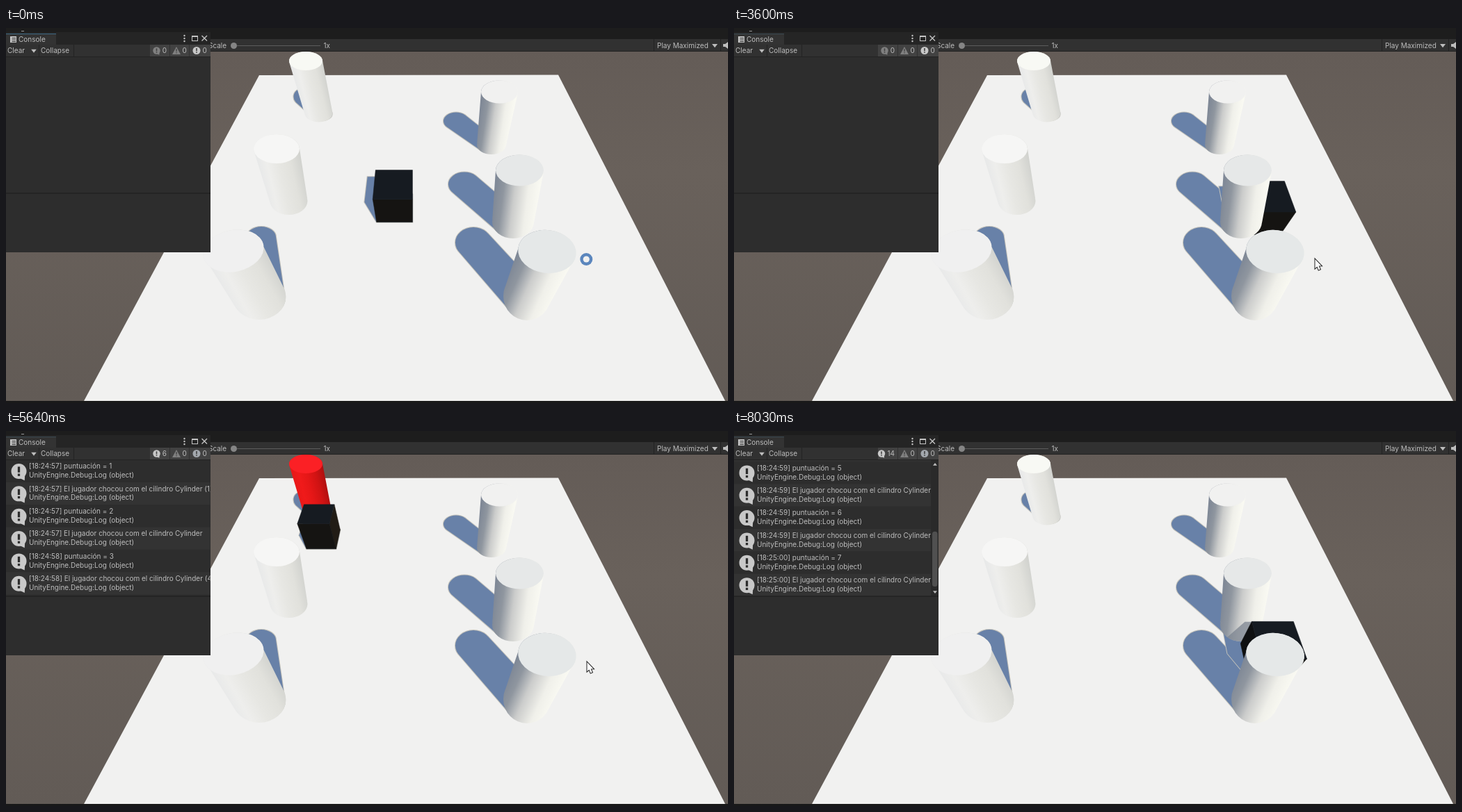
Recreate the animation shown at these times as an HTML page with a canvas. Size 1038 by 540 pixels, loop 8.44 s.

```html
<!DOCTYPE html>
<html lang="es">
<head>
<meta charset="utf-8">
<style>
html, body { margin: 0; width: 100%; height: 100%; overflow: hidden; background: #191919; }
canvas { display: block; }
</style>
</head>
<body>
<canvas id="stage" width="1038" height="540"></canvas>
<script>
const ctx = document.getElementById('stage').getContext('2d');
const LOOP = 8440;
const FONT = '10px Inter, sans-serif';
const SHADOW = '#6881a8', RIM = '#c2c1ba';
const HALF = 0.488, HEIGHT = 0.97;       // cube size
const LIGHT = { x: -0.39, z: 0.7 };      // shadow offset per unit of height

// Cube moves: start, end, steps, target x, target z (front face)
const START = [-0.48, 4.8];
const MOVES = [
  [1500, 1500, 1, -0.48, 5.95], [1680, 1820, 3, -0.48, 9.06],
  [2030, 2290, 5, 1.94, 9.06], [2500, 2690, 4, 3.85, 9.06],
  [2830, 3030, 4, 3.85, 6.25], [3290, 3430, 3, 3.84, 4.4],
  [3600, 3710, 3, 1.96, 4.4], [3980, 4260, 5, 1.96, 6.74],
  [4460, 4510, 2, 1.96, 7.85], [4580, 5250, 11, -2.42, 7.9],
  [5310, 5640, 6, -3, 7.9], [5710, 6090, 7, -3, 3.84],
  [6170, 6440, 5, -2.75, 0.21], [6500, 6980, 8, 2.9, 0.82],
  [7060, 7310, 5, 3.1, 3.21]
];

// Ellipses are [cx, cy, rx, ry, rotation]; tip is the far end of the shadow.
const CYLINDERS = [
  { x: -3.5, z: 9.84, top: [431, 47.5, 24, 13.5], base: [449.5, 123, 20, 12.5], tip: [424, 99, 10.5, 11], cap: '#f8f9f4', red: [5250, 5770] },
  { x: 2.64, z: 8.05, top: [709.5, 92, 26.5, 16.5], base: [698, 168, 21, 14], tip: [647, 134, 18, 12.5], cap: '#f1f1f0', red: [4260, 4650] },
  { x: -3.57, z: 5.7, top: [389, 174, 33, 21], base: [406.5, 249, 27, 20], cap: '#f6f6f5', red: [5840, 6090] },
  { x: 2.75, z: 4.85, top: [738.5, 205, 34.5, 22.5], base: [729, 279, 30, 24], tip: [659, 225, 23, 17.5], cap: '#e6e8e8', red: [3640, 4120] },
  { x: -3.6, z: 2.77, top: [327, 321, 44, 30, -0.2], base: [364, 387, 38.5, 33], tip: [367, 301, 21, 15], cap: '#f0f0f0', red: [6170, 6400] },
  { x: 2.66, z: 2.6, top: [778, 322, 42, 31, 0.12], base: [749, 386, 34, 35], tip: [672, 309, 26, 22], cap: '#e5e8e8', red: [7120, 7310] }
];
const SIDES = {
  left: ['#e8e9e9', '#eeeeec', '#e7e7e3', '#e1e1dc', '#d2d3cf'],
  right: ['#7f8896', '#8f969f', '#cbcccb', '#f0f0ea', '#f9f9f2'],
  redLeft: ['#e81818', '#f01a1a', '#e61717', '#d01313', '#b01010'],
  redRight: ['#8c0f12', '#b81215', '#de1619', '#ee1a1a', '#dc1515']
};

// Score messages: time shown, clock, cylinder hit
const HITS = [
  [3710, '18:24:57', ' (1)'], [4260, '18:24:57', ''], [5310, '18:24:58', ' (4)'],
  [5840, '18:24:59', ' (3)'], [6170, '18:24:59', ' (2)'], [6300, '18:24:59', ' (2)'],
  [7120, '18:25:00', ' (5)']
];

function progress(t, t0, t1, steps) {
  if (t < t0) return 0;
  const i = Math.floor((t - t0) / (t1 - t0 || 1) * (steps - 1) + 1e-6);
  return Math.min(steps, i + 1) / steps;
}

function cubeAt(t) {
  let [x, z] = START;
  for (const [t0, t1, steps, tx, tz] of MOVES) {
    const p = progress(t, t0, t1, steps);
    x += (tx - x) * p;
    z += (tz - z) * p;
  }
  return { x, l: x - HALF, r: x + HALF, z, b: z + 1 };
}

function project(x, y, z) {
  const down = 6.69 - y, depth = z * 0.571 + down * 0.821;
  return [584 + 436 * x / depth, 286 + 436 * (down * 0.571 - z * 0.821) / depth];
}

function rect(x, y, w, h, color) {
  ctx.fillStyle = color;
  ctx.fillRect(x, y, w, h);
}

function poly(points, fill, stroke, width = 1) {
  ctx.beginPath();
  points.forEach(p => ctx.lineTo(...p));
  ctx.closePath();
  if (stroke) { ctx.strokeStyle = stroke; ctx.lineWidth = width; ctx.stroke(); }
  ctx.fillStyle = fill;
  ctx.fill();
}

function disc([cx, cy, rx, ry = rx, rot = 0], fill) {
  ctx.beginPath();
  ctx.ellipse(cx, cy, rx, ry, rot, 0, 7);
  ctx.fillStyle = fill;
  ctx.fill();
}

function label(str, x, y, color = '#bdbdbd', align = 'left') {
  ctx.font = FONT;
  ctx.textAlign = align;
  ctx.textBaseline = 'middle';
  ctx.fillStyle = color;
  ctx.fillText(str, x, y);
}

function clipped(path, draw) {
  ctx.save();
  ctx.clip(path);
  draw();
  ctx.restore();
}

function box(x, y, w, h) {
  const path = new Path2D();
  path.rect(x, y, w, h);
  return path;
}

// Points where lines along an axis with normal (nx, ny) touch an ellipse
function tangents([cx, cy, rx, ry], nx, ny) {
  const k = Math.hypot(rx * nx, ry * ny), ox = rx * rx * nx / k, oy = ry * ry * ny / k;
  return [[cx - ox, cy - oy], [cx + ox, cy + oy]];
}

// Outline of ellipse a swept to the lower ellipse b
function sweep(a, b) {
  const nx = b[1] - a[1], ny = a[0] - b[0];
  const [al, ar] = tangents(a, nx, ny), [bl, br] = tangents(b, nx, ny);
  const path = new Path2D();
  for (const [cx, cy, rx, ry, rot = 0] of [a, b]) {
    const ring = new Path2D();
    ring.ellipse(cx, cy, rx, ry, rot, 0, 2 * Math.PI);
    path.addPath(ring);
  }
  path.moveTo(...al);
  [ar, br, bl].forEach(p => path.lineTo(...p));
  path.closePath();
  return path;
}

function drawCylinderShadow({ x, base: [cx, cy, rx, ry], tip }) {
  if (!tip) return;
  const foot = [cx - Math.sign(x) * rx * 0.2, cy + ry * 0.05, rx * 0.76, ry * 0.76];
  const shape = sweep(tip, foot);
  ctx.strokeStyle = RIM;
  ctx.lineWidth = 2;
  ctx.stroke(shape);
  ctx.fillStyle = SHADOW;
  ctx.fill(shape);
}

// Gradient across the axis of a cylinder
function sideGradient(top, base, colors) {
  const ux = base[1] - top[1], uy = top[0] - base[0];
  const mx = (top[0] + base[0]) / 2, my = (top[1] + base[1]) / 2;
  const r = (top[2] + base[2]) / 2 / Math.hypot(ux, uy);
  const g = ctx.createLinearGradient(mx - ux * r, my - uy * r, mx + ux * r, my + uy * r);
  [0, 0.2, 0.45, 0.75, 1].forEach((stop, i) => g.addColorStop(stop, colors[i]));
  return g;
}

// Shadow of the cube on an upright plane at the given depth
function castShadow({ l, r, z, b }, plane) {
  const land = ([x, depth]) => {
    const drop = (plane - depth) / LIGHT.z;
    return project(x + LIGHT.x * drop, HEIGHT - drop, plane);
  };
  poly([[l, z], [l, b], [r, b], [r, z]].map(land), 'rgba(125,132,145,0.75)');
}

function drawCylinder({ x, z, top, base, cap, red }, cube, t) {
  const hot = t >= red[0] && t < red[1];
  const side = x < 0 ? ['left', 'redLeft'] : ['right', 'redRight'];
  const body = sweep(top, base), plane = z - 0.5;
  ctx.fillStyle = sideGradient(top, base, SIDES[side[+hot]]);
  ctx.fill(body);
  if (cube.b < plane) clipped(body, () => castShadow(cube, plane));
  disc(top, hot ? '#fb2025' : cap);
}

function drawCubeShadow({ l, r, z, b }) {
  const { x: dx, z: dz } = LIGHT;
  const outline = [[l, z], [r, z], [r, b], [r + dx, b + dz], [l + dx, b + dz], [l + dx, z + dz]];
  poly(outline.map(([px, pz]) => project(px, 0, pz)), SHADOW, RIM, 2);
}

function drawCube({ l, r, z, b }) {
  const h = HEIGHT;
  const face = (color, ...corners) => poly(corners.map(c => project(...c)), color, color, 0.5);
  if (l > 0) face('#0f1011', [l, 0, z], [l, h, z], [l, h, b], [l, 0, b]);
  if (r < 0) face('#211c15', [r, 0, z], [r, h, z], [r, h, b], [r, 0, b]);
  face('#151412', [l, 0, z], [r, 0, z], [r, h, z], [l, h, z]);
  face('#161b21', [l, h, z], [r, h, z], [r, h, b], [l, h, b]);
}

function drawScene(t) {
  const sky = ctx.createLinearGradient(0, 34, 0, 537);
  sky.addColorStop(0, '#645c57');
  sky.addColorStop(0.35, '#69615b');
  sky.addColorStop(1, '#625b56');
  rect(0, 34, 1038, 503, sky);
  poly([[364, 68], [794, 67.5], [1034.5, 538], [111.5, 538]], '#f1f1f0');
  const cube = cubeAt(t);
  CYLINDERS.forEach(drawCylinderShadow);
  drawCubeShadow(cube);
  const items = CYLINDERS.map(c => [Math.hypot(c.x, c.z), () => drawCylinder(c, cube, t)]);
  items.push([Math.hypot(cube.x, cube.z + 0.5), () => drawCube(cube)]);
  items.sort((a, b) => b[0] - a[0]).forEach(item => item[1]());
}

function arrow(x, y, size, dir = 1) {
  poly([[x - size, y - size * 0.6 * dir], [x + size, y - size * 0.6 * dir], [x, y + size * 0.7 * dir]], '#bdbdbd');
}

function drawGameBar() {
  rect(0, 0, 1038, 16, '#1d1d1d');
  rect(0, 16, 1038, 18, '#313131');
  rect(0, 33, 1038, 1, '#222');
  label('Scale', 291, 25.5);
  rect(328, 25, 124, 1, '#5c5c5c');
  disc([327.5, 25.5, 4.5], '#858585');
  label('1x', 456.5, 25.5);
  rect(931, 16, 1, 17, '#222');
  label('Play Maximized', 936, 25.5);
  arrow(1019, 25.5, 4);
  rect(1027, 16, 1, 17, '#222');
  poly([[1031, 23], [1034, 23], [1038, 20], [1038, 30], [1034, 27], [1031, 27]], '#bdbdbd');
  rect(0, 537, 1038, 3, '#191919');
}

function bubble(x, y, r, color, mark) {
  disc([x, y, r], color);
  poly([[x - r * 0.1, y + r * 0.8], [x + r * 0.8, y + r * 0.3], [x + r * 0.75, y + r * 1.2]], color);
  rect(x - r * 0.15, y - r * 0.6, r * 0.3, r * 0.75, mark);
  rect(x - r * 0.15, y + r * 0.32, r * 0.3, r * 0.3, mark);
}

function drawMessages(count) {
  const scrolled = count > 6, right = scrolled ? 283 : 293.5, pitch = 32.35;
  const rows = HITS.flatMap(([, clock, name], i) => [
    `[${clock}] puntuación = ${i + 1}`,
    `[${clock}] El jugador chocou com el cilindro Cylinder${name}`
  ]).slice(0, count);
  clipped(box(0, 42, right, 196), () => rows.forEach((text, i) => {
    const y = scrolled ? 238 - (count - i) * pitch : 41.5 + i * pitch;
    rect(0, y, 294, pitch, i % 2 ? '#333' : '#2d2d2d');
    bubble(18.5, y + 16.5, 11, '#c8c8c8', '#2d2d2d');
    label(text, 33, y + 9.8);
    label('UnityEngine.Debug:Log (object)', 33, y + 22.6);
  }));
  if (!scrolled) return;
  rect(283, 42, 11, 196, '#2a2a2a');
  arrow(289, 48, 3, -1);
  arrow(289, 232, 3);
  const h = 183 * 196 / (count * pitch);
  ctx.beginPath();
  ctx.roundRect(285, 224 - h, 7.5, h, 3.5);
  ctx.fillStyle = '#505050';
  ctx.fill();
}

function drawConsole(count, focused) {
  rect(0, 6, 294, 317, '#252525');
  rect(0, 8, 72, 16, '#333');
  rect(0, 8, 72, 1, focused ? '#3d6a85' : '#3c4a52');
  rect(22, 4, 4, 1, '#999');
  rect(6, 12, 9, 9, '#c4c4c4');
  [14, 16.5, 19].forEach(y => rect(8.5, y, 5.5, 1, '#333'));
  label('Console', 18, 17);
  [11, 15, 19].forEach(y => disc([256.5, y, 1.2], '#c4c4c4'));
  ctx.strokeStyle = '#c4c4c4';
  ctx.lineWidth = 1;
  ctx.strokeRect(267.5, 11.5, 8, 7);
  rect(267, 11, 9, 2, '#c4c4c4');
  ctx.lineWidth = 1.4;
  ctx.beginPath();
  ctx.moveTo(281.5, 11); ctx.lineTo(289, 18.5);
  ctx.moveTo(289, 11); ctx.lineTo(281.5, 18.5);
  ctx.stroke();

  rect(0, 24, 294, 17, '#313131');
  label('Clear', 2, 33);
  arrow(40, 33, 3.8);
  label('Collapse', 50, 33);
  [47, 97].forEach(x => rect(x, 24, 1, 17, '#232323'));
  [[207, 28], [236, 27], [264, 30]].forEach(([x, w]) => rect(x, 24, w, 17, '#424242'));
  bubble(count > 9 ? 212 : 216.5, 32.5, 5.2, count ? '#c8c8c8' : '#808080', '#424242');
  label(count, 231, 33, '#bdbdbd', 'right');
  poly([[245, 27], [251, 38], [239, 38]], '#808080');
  rect(244.4, 30, 1.3, 4, '#424242');
  rect(244.4, 35, 1.3, 1.3, '#424242');
  label('0', 253.5, 33);
  disc([274, 32.5, 5.5], count ? '#a3a8ae' : '#c8c8c8');
  rect(273.2, 29, 1.6, 4.2, '#424242');
  rect(273.2, 34.3, 1.6, 1.6, '#424242');
  label('0', 282.5, 33);

  rect(0, 41, 294, 1, '#222');
  rect(0, 42, 294, 281, '#2d2d2d');
  drawMessages(count);
  rect(0, 237.5, 294, 1, '#1d1d1d');
}

function drawPointer(t) {
  const fade = t < 400 ? 1 : t < 530 ? 0.5 : 0;
  if (fade) {
    ctx.globalAlpha = fade;
    disc([834.3, 333, 9], '#5b86bd');
    disc([834.3, 333, 4.6], '#f1f1f0');
    ctx.globalAlpha = 1;
  }
  if (t < 70 || t >= 8030) return;
  const p = progress(t, 7640, 8030, 7);
  const x = 835.5 - 330 * p, y = 333 + 227 * p;
  const shape = [[0, 0], [0, 13], [3, 10.4], [5, 15.4], [7.3, 14.4], [5.2, 9.6], [9, 9.4]];
  poly(shape.map(([a, b]) => [x + a, y + b]), '#fff', '#222', 2);
}

function frame(now) {
  const t = now % LOOP;
  rect(0, 0, 1038, 540, '#191919');
  clipped(box(0, 34, 1038, 503), () => drawScene(t));
  drawGameBar();
  drawConsole(2 * HITS.filter(hit => t >= hit[0]).length, t < 400);
  drawPointer(t);
  requestAnimationFrame(frame);
}
requestAnimationFrame(frame);
</script>
</body>
</html>
```
